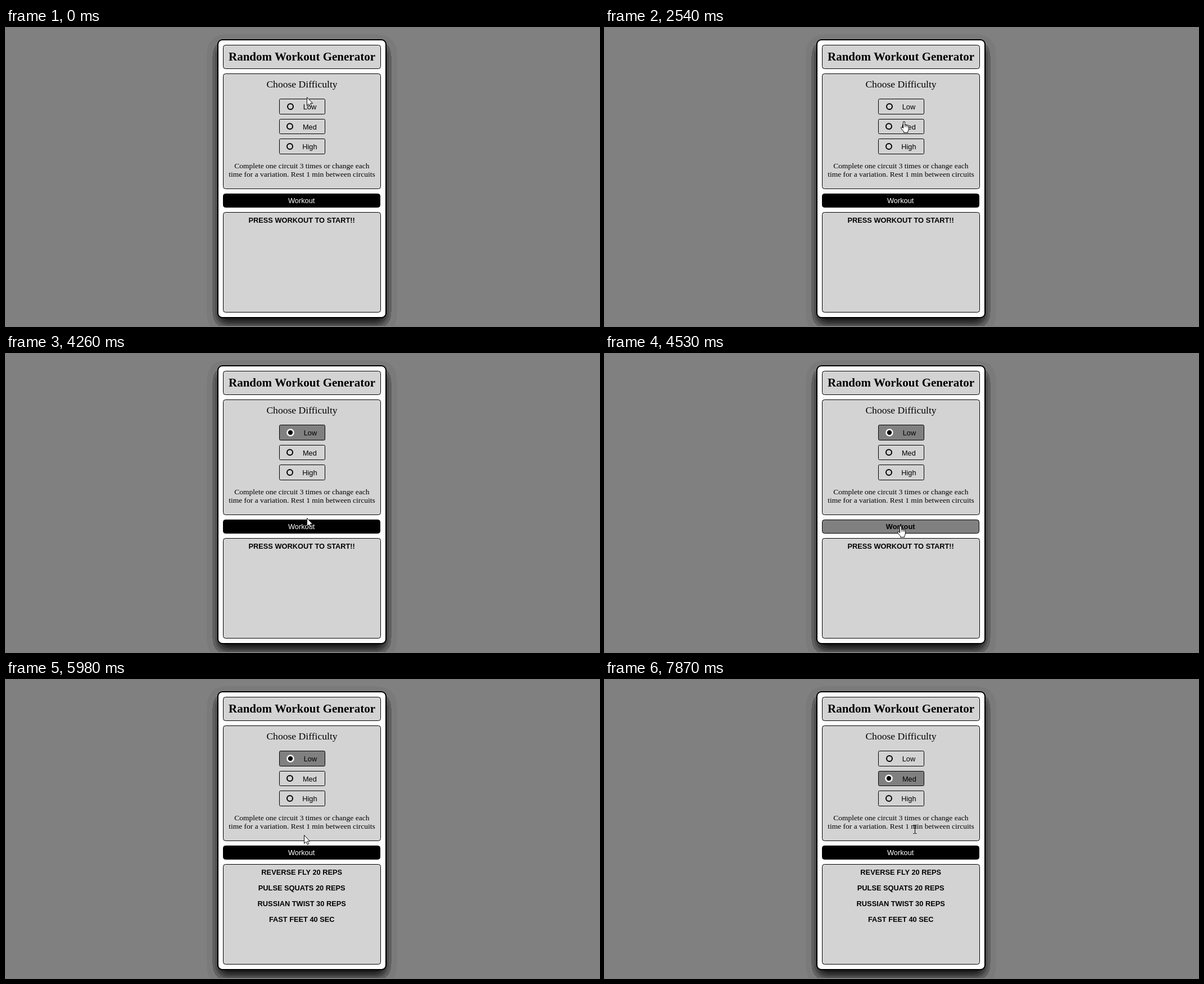
Write an HTML page that moves like this. It is 1055 px wide and 531 px high and loops after 8 s.

```html
<!DOCTYPE html>
<html lang="en">
<head>
<meta charset="utf-8">
<title>Random Workout Generator</title>
<style>
  html, body { margin: 0; width: 100%; height: 100%; overflow: hidden; background: #808080; }
  svg { display: block; }
  text { text-anchor: middle; font-variant-ligatures: none; white-space: pre; }
  .serif { font-family: "Liberation Serif", "Times New Roman", serif; }
  .sans { font-family: "Liberation Sans", Arial, sans-serif; font-size: 12.8px; }
  .bold { font-weight: bold; }
  .panel rect { fill: #d3d3d3; stroke: #000; }
  .cursor { fill: #fff; stroke: #000; stroke-linejoin: round; }
</style>
</head>
<body>
<svg width="1055" height="531" viewBox="0 0 1055 531">
  <defs>
    <filter id="soft" filterUnits="userSpaceOnUse" x="330" y="-20" width="394" height="600" color-interpolation-filters="sRGB">
      <feGaussianBlur stdDeviation="10"/>
      <feComponentTransfer><feFuncA id="bands" type="discrete" tableValues="0 1"/></feComponentTransfer>
    </filter>
  </defs>
  <rect width="1055" height="531" fill="#808080"/>
  <rect x="376" y="30" width="301" height="497" rx="9" filter="url(#soft)"/>
  <rect x="377" y="21" width="299" height="495" rx="8" fill="#fff" stroke="#000" stroke-width="2"/>

  <g class="panel">
    <rect x="386.5" y="30.5" width="280" height="42" rx="4"/>
    <rect x="386.5" y="81.5" width="280" height="205" rx="4"/>
    <rect x="386.5" y="328.5" width="280" height="178" rx="4"/>
  </g>

  <g class="serif">
    <text class="bold" x="526.5" y="58" font-size="21">Random Workout Generator</text>
    <text x="526.5" y="106" font-size="17.6">Choose Difficulty</text>
    <g font-size="13.5">
      <text x="526.3" y="250">Complete one circuit 3 times or change each</text>
      <text x="526.5" y="265">time for a variation. Rest 1 min between circuits</text>
    </g>
  </g>

  <g id="options" class="sans"></g>

  <rect id="button" x="386.5" y="295.5" width="279" height="24" rx="4" stroke="#000"/>
  <text id="caption" class="sans" x="525.7" y="312">Workout</text>

  <g id="results" class="sans bold"></g>

  <g id="arrow" class="cursor">
    <path d="M.5 .5V15.3L3.9 12.1L6.2 17.3L8.6 16.3L6.3 11.2H10.6Z"/>
  </g>
  <g id="hand" class="cursor">
    <path d="M4.5 12.5V2a1.5 1.5 0 0 1 3 0V7.2a1.3 1.2 0 0 1 2.5 .3a1.2 1.1 0 0 1 2.3 .5a1.1 1 0 0 1 2.1 .9V14q0 2-1.6 4.2V20.4H5.6V18.4Q3 16 .8 12.6q-.6-2 1.2-2q1.2 .3 2.5 1.9z"/>
    <path d="M7.5 7.2V10.5M10 7.6V10.7M12.3 8.2V10.9" fill="none" stroke-width=".8"/>
  </g>
  <g id="beam">
    <path d="M-3 .5H-.5M.5 .5H3M0 1V15M-3 15.5H-.5M.5 15.5H3" fill="none" stroke="#000"/>
  </g>
</svg>
<script>
const LOOP = 8000;
const NS = "http://www.w3.org/2000/svg";
const $ = id => document.getElementById(id);

function add(parent, tag, attrs, text) {
  const el = document.createElementNS(NS, tag);
  set(el, attrs);
  if (text) el.textContent = text;
  parent.appendChild(el);
  return el;
}

function set(el, attrs) {
  for (const key in attrs) el.setAttribute(key, attrs[key]);
}

// Shadow opacity falls off in a few flat steps.
const bandAlpha = a =>
  a < 0.02 ? 0 : a < 0.18 ? 0.047 : Math.min(1, 0.25 + 0.13 * Math.floor((a - 0.18) / 0.13));
set($("bands"), {
  tableValues: Array.from({ length: 43 }, (_, i) => bandAlpha(i / 43).toFixed(3)).join(" ")
});

const options = [
  { name: "Low", top: 126.5, height: 27, dot: [506, 140], base: 145 },
  { name: "Med", top: 162.5, height: 26, dot: [505, 175.3], base: 180.5 },
  { name: "High", top: 197.5, height: 27, dot: [505, 211], base: 216 }
].map(o => {
  const g = $("options");
  const [cx, cy] = o.dot;
  return {
    box: add(g, "rect", { x: 486.5, y: o.top, width: 81, height: o.height, rx: 2, stroke: "#000" }),
    ring: add(g, "circle", { cx, cy, "stroke-width": 2 }),
    label: add(g, "text", { y: o.base }, o.name)
  };
});

const PROMPT = ["PRESS WORKOUT TO START!!"];
const ROUTINE = ["REVERSE FLY 20 REPS", "PULSE SQUATS 20 REPS", "RUSSIAN TWIST 30 REPS", "FAST FEET 40 SEC"];
const lines = ROUTINE.map((_, i) => add($("results"), "text", { x: 526.2, y: 347 + 28 * i }));

// Pointer steps: time, shape, x, y
const steps = [
  [0, "arrow", 535, 123],
  [150, "hand", 528, 130],
  [400, "hand", 528, 131],
  [690, "hand", 528, 143],
  [840, "arrow", 533, 157],
  [990, "hand", 528, 162],
  [1110, "hand", 528, 165],
  [1260, "hand", 527, 166],
  [2540, "hand", 526, 166],
  [2690, "hand", 526, 148],
  [2810, "hand", 526, 138],
  [3520, "hand", 534, 142],
  [3640, "arrow", 566, 159],
  [3760, "arrow", 574, 192],
  [3880, "arrow", 569, 229],
  [4000, "beam", 556, 252],
  [4120, "arrow", 540, 288],
  [4260, "arrow", 535, 292],
  [4410, "hand", 525, 299],
  [4530, "hand", 520, 306],
  [4780, "hand", 519, 306],
  [5860, "hand", 521, 298],
  [5980, "arrow", 530, 276],
  [6100, "beam", 539, 246],
  [6220, "hand", 537, 210],
  [6340, "hand", 539, 181],
  [6460, "hand", 539, 174],
  [7610, "hand", 543, 179],
  [7750, "hand", 554, 208],
  [7870, "beam", 551, 258]
];

function drawOption(o, on) {
  set(o.box, { fill: on ? "#808080" : "#d3d3d3" });
  set(o.ring, on
    ? { r: 5.5, fill: "#000", stroke: "#fff", "stroke-width": 2.6 }
    : { r: 5, fill: "none", stroke: "#000", "stroke-width": 2 });
  set(o.label, { x: on ? 541.4 : 540.4 });
}

function draw(t) {
  const chosen = t < 3400 ? -1 : t < 7150 ? 0 : 1;
  options.forEach((o, i) => drawOption(o, i === chosen));

  const hover = t >= 4410 && t < 5980;
  set($("button"), { fill: hover ? "#808080" : "#000" });
  set($("caption"), { fill: hover ? "#000" : "#fff", "font-weight": hover ? "bold" : "normal" });

  const list = t < 5030 ? PROMPT : ROUTINE;
  lines.forEach((el, i) => { el.textContent = list[i] || ""; });

  const [, shape, x, y] = steps.filter(s => s[0] <= t).pop();
  for (const id of ["arrow", "hand", "beam"]) {
    const shift = id === "beam" ? 0.5 : 0;
    set($(id), {
      visibility: id === shape ? "visible" : "hidden",
      transform: `translate(${x + shift} ${y})`
    });
  }
}

const start = performance.now();
function tick() {
  draw((performance.now() - start) % LOOP);
  requestAnimationFrame(tick);
}
draw(0);
requestAnimationFrame(tick);
</script>
</body>
</html>
```
